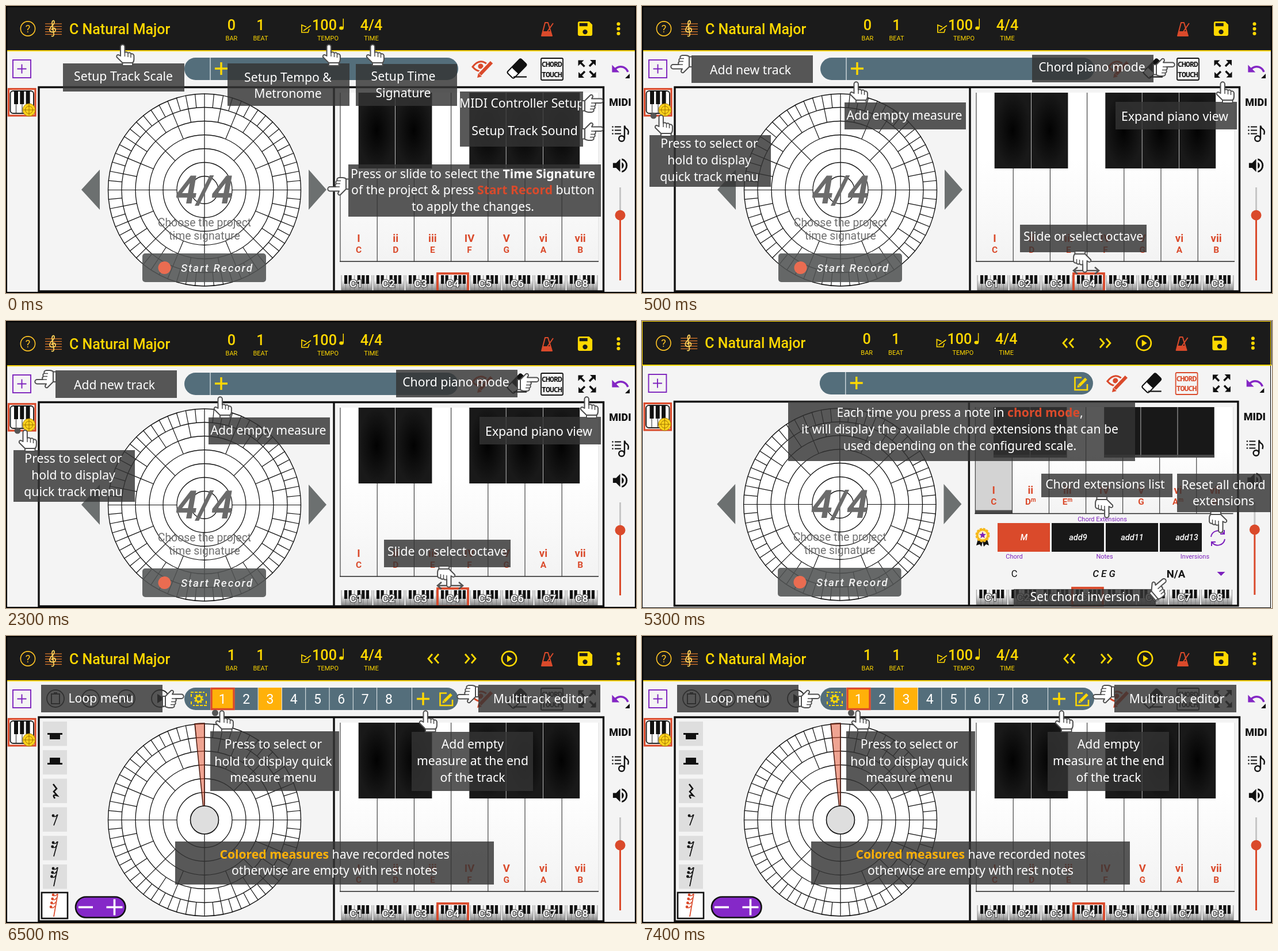
Animation, 1095 px wide and 500 px high, one loop 8000 ms. Source, as an HTML page:

```html
<!DOCTYPE html>
<html lang="en">
<head>
<meta charset="utf-8">
<title>Music app guide</title>
<style>
html, body { margin: 0; width: 100%; height: 100%; overflow: hidden; background: #f4f4f4; }
svg { display: block; width: 1095px; height: 500px; }
text { font-family: Roboto, sans-serif; text-anchor: middle; }
.tip { font-family: "Noto Sans", "Open Sans", sans-serif; font-size: 21.2px; fill: #fff; }
.chord { font-family: "Noto Sans Mono", monospace; letter-spacing: -.8px; }
.start { text-anchor: start; }
.it { font-style: italic; }
.md { font-weight: 500; }
.bd { font-weight: 700; }
</style>
</head>
<body>
<svg id="stage" viewBox="0 0 1095 500">
  <defs>
    <radialGradient id="ebony"><stop offset="0" stop-color="#020202"/><stop offset="1" stop-color="#191919"/></radialGradient>
    <linearGradient id="ivory" x2="0" y2="1"><stop offset=".4" stop-color="#fff"/><stop offset="1" stop-color="#f3f3f3"/></linearGradient>
    <linearGradient id="mini" x2="0" y2="1"><stop offset=".3" stop-color="#f4f4f4"/><stop offset="1" stop-color="#858585"/></linearGradient>
  </defs>
</svg>
<script>
const YELLOW = '#ffd800', RED = '#da4a2b', PURPLE = '#7d22bd', INK = '#111', GREY = '#6c7070';
const range = (n, fn) => Array.from({ length: n }, (_, i) => fn(i)).join('');

const rect = (x, y, x2, y2, fill, more = '') =>
  `<rect x="${x}" y="${y}" width="${x2 - x}" height="${y2 - y}" fill="${fill}" ${more}/>`;
const circle = (x, y, r, fill, more = '') => `<circle cx="${x}" cy="${y}" r="${r}" fill="${fill}" ${more}/>`;
const fill = (d, color, more = '') => `<path d="${d}" fill="${color}" ${more}/>`;
const line = (d, color, w = 1, more = '') => `<path d="${d}" fill="none" stroke="${color}" stroke-width="${w}" ${more}/>`;
const text = (x, y, s, size, color, cls = '', more = '') =>
  `<text x="${x}" y="${y}" font-size="${size}" fill="${color}" class="${cls}" ${more}>${s}</text>`;
const group = (move, body) => `<g transform="${move}">${body}</g>`;
const bold = (s, color) => `<tspan font-weight="700" fill="${color}">${s}</tspan>`;

// Lines are given as baseline, text, baseline, text...
function tip(x, y, x2, y2, cx, ...lines) {
  let out = rect(x, y, x2, y2, '#343434', 'fill-opacity=".82"');
  for (let i = 0; i < lines.length; i += 2) out += `<text class="tip" x="${cx}" y="${lines[i]}">${lines[i + 1]}</text>`;
  return out;
}

const hand = (x, y, turn = 0) => group(`translate(${x} ${y}) rotate(${turn})`,
  fill('M-3.5 20V4a3.7 3.7 0 0 1 7.4 0V14q3.500-2 5.500 1q4-2 5.500 1.500q4-1 5 3V26q0 4-3 7H1L-10 22q-1-4 3-4z', '#fff',
    'stroke="#4f4f4f" stroke-width="2" stroke-linejoin="round"') +
  line('M4 14v7M9.500 16v6M14.500 17v6', '#4f4f4f', 1.5) +
  rect(0, 32, 17.5, 37, '#fff', 'stroke="#4f4f4f" stroke-width="2"'));

function toolbar(bar, transport) {
  let out = rect(0, 0, 1097, 78, '#1b1b1b') + rect(0, 77, 1097, 79, YELLOW);
  out += circle(38, 39.5, 12.6, 'none', 'stroke="#ffc425" stroke-width="1.6"') + text(38, 46, '?', 18, '#ffc425');
  out += range(5, i => line(`M68 ${31 + i * 4.6}H97`, '#d9772b', 1.3));
  out += line('M79 52c3 2 5-1 4-4L80 30c0-5 4-6 4-2 0 6-9 8-8 14 1 5 11 5 10-1-1-4-7-3-6 1', '#ffd25a', 1.8);
  out += text(110, 48.5, 'C Natural Major', 25, YELLOW, 'md start');
  const fields = [[392, bar, 'BAR'], [442.5, 1, 'BEAT'], [553.5, 100, 'TEMPO', 559.5], [635, '4/4', 'TIME']];
  for (const [x, value, name, nx = x] of fields)
    out += text(x, 41.5, value, 25.2, YELLOW, 'md') + text(nx, 60, name, 11, YELLOW);
  out += line('M522 36.5L514 33V46H525L527 40M517 43L530 34', YELLOW, 1.7);
  out += `<ellipse cx="583" cy="38.5" rx="3.8" ry="3" fill="${YELLOW}"/>` + line('M586.3 22V38', YELLOW, 1.5);
  if (transport) {
    const chevrons = 'M-2 -8L-9 0L-2 8M9 -8L2 0L9 8';
    out += group('translate(743 39.5)', line(chevrons, YELLOW, 2.8));
    out += group('translate(807 39.5) scale(-1 1)', line(chevrons, YELLOW, 2.8));
    out += circle(874.5, 39.5, 12.6, 'none', `stroke="${YELLOW}" stroke-width="2.7"`) + fill('M871 33.5V45.5L880 39.5z', YELLOW);
  }
  out += line('M937 29H942L949 52H931zM933 45H947M940 46L951 30', RED, 2, 'stroke-linejoin="round"') + fill('M933 45H947L949 53H931z', RED);
  out += group('translate(989.7 22.7) scale(1.4)', fill('M17 3H5c-1.1 0-2 .9-2 2v14c0 1.1.9 2 2 2h14c1.1 0 2-.9 2-2V7zm-5 16a3 3 0 1 1 0-6 3 3 0 0 1 0 6zm3-10H5V5h10z', YELLOW));
  return out + range(3, i => circle(1064.5, 31.3 + i * 8.4, 3, YELLOW));
}

const plus = (x, y, r, color, w) => line(`M${x - r} ${y}H${x + r}M${x} ${y - r}V${y + r}`, color, w);
const editIcon = line('M766 99.5H754.5V121H776V111', YELLOW, 2.6) +
  line('M762 113.5L774 101.5', YELLOW, 5) + fill('M758.5 117l1-5 4 4z', YELLOW);

function measures() {
  const x = i => 356 + i * 41.3;
  let out = '';
  for (const i of [0, 2]) out += rect(x(i), 90, x(i) + 41, 129, '#ffb109');
  out += range(8, i => line(`M${x(i) - .5} 90V129`, '#e8eef0', 1) + text(x(i) + 20.3, 118, i + 1, 23, '#fff'));
  out += rect(357, 91.5, 396, 127.5, 'none', `stroke="${RED}" stroke-width="3.4"`);
  out += line('M705.5 90V129', '#e8eef0') + plus(725, 109.5, 11, YELLOW, 3.4);
  out += line('M322 106V98H345M348 100V106M348 113V121H325M322 119V113', YELLOW, 2, 'stroke-dasharray="5 2"');
  out += circle(335, 109.5, 4.8, 'none', `stroke="${YELLOW}" stroke-width="3"`);
  return out + circle(335, 109.5, 7, 'none', `stroke="${YELLOW}" stroke-width="2.4" stroke-dasharray="2.75"`);
}

function toolRow({ songs, edit, chord }) {
  let out = rect(12, 94, 43, 125, 'none', `stroke="${PURPLE}" stroke-width="1.9"`) + plus(27.5, 109.5, 8, PURPLE, 1.9);
  out += rect(310, 90, 786, 129, '#546e7b', 'rx="19.5"');
  out += songs ? measures() : line('M355 90V129', '#e8eef0', 1.2) + plus(374, 109, 11, YELLOW, 3.4);
  if (edit) out += editIcon;
  out += line('M811 106Q825 88 840 105Q825 122 811 106z', RED, 3) + circle(825, 105, 4.6, RED);
  out += line('M843 99L822 121', '#f4f4f4', 10) + line('M844 98L824 119', RED, 6) + fill('M819 125l2-8 6 6z', RED);
  out += group('translate(888 109) rotate(-46)', rect(-17, -8, 17, 8, '#fff', 'rx="3" stroke="#111" stroke-width="2"') + rect(-5, -8, 17, 8, INK, 'rx="2"'));
  out += line('M882 123.5H905', INK, 2.2);
  out += rect(930, 91, 968, 129, 'none', `rx="2" stroke="${chord}" stroke-width="1.8"`);
  out += text(948.5, 106, 'CHORD', 13, chord, 'chord bd') + text(948.5, 123.5, 'TOUCH', 13, chord, 'chord bd');
  out += range(4, i => group(`translate(1010 109.5) rotate(${i * 90})`,
    fill('M-15.5 -15H-5.5L-15.5 -5z', INK) + line('M-13 -12.5L-4.5 -4', INK, 3.4)));
  out += group('translate(1050.5 92.5) scale(1.43)', fill('M12.5 8c-2.65 0-5.05 1-6.9 2.6L2 7v9h9l-3.6-3.6c1.4-1.2 3.1-1.9 5.1-1.9 3.5 0 6.5 2.3 7.6 5.5l2.4-.8C21.1 11 17.2 8 12.5 8z', '#8427c4'));
  return out + fill('M1084 118V126H1076z', INK);
}

function sides() {
  let out = rect(4.5, 144.5, 51, 191, '#f8f8f8', `stroke="${RED}" stroke-width="3.2"`);
  out += rect(7.5, 148, 48, 187, '#fff', 'rx="5" stroke="#222" stroke-width="2"');
  out += line('M17.5 150V187M28 150V187M38 150V187', '#222', 1) + range(3, i => rect(14 + i * 10.3, 148, 21 + i * 10.3, 171, INK));
  out += circle(40, 181, 11, '#ffd21c', 'stroke="#8d6a00" stroke-width=".8"') + circle(40, 181, 6.5, 'none', 'stroke="#9a7400"') + plus(40, 181, 10, '#9a7400', 1);
  out += text(1067.5, 174, 'MIDI', 18, INK, '', 'font-weight="900"');
  out += range(3, i => circle(1054.5, 210.5 + i * 6, 1.3, INK) + line(`M1058 ${210.5 + i * 6}H1069`, INK, 2));
  out += circle(1070, 231, 4.8, 'none', 'stroke="#111" stroke-width="2.4"') + line('M1075 231V208.5Q1076 213 1080 215Q1083 218 1081 224', INK, 2.4);
  out += group('translate(1050.7 261) scale(1.4)', fill('M3 9v6h4l5 5V4L7 9zm13.5 3c0-1.8-1-3.3-2.5-4v8c1.5-.7 2.5-2.2 2.5-4zM14 3.2v2.1a7 7 0 0 1 0 13.4v2.1a9 9 0 0 0 0-17.6z', INK));
  out += line('M1067.5 316V364', '#c6c6c6', 3) + line('M1067.5 364V478', RED, 3) + circle(1067.5, 364.5, 9, RED);
  return out;
}

// Each ring outwards holds twice as many beats as the one inside it.
function wheel(cx = 345, cy = 320.5) {
  let out = circle(cx, cy, 168, '#fff');
  for (let ring = 1; ring < 7; ring++) {
    const beats = 2 ** ring, r = ring * 24, inner = ring === 1 ? 0 : r;
    let d = '';
    for (let i = 0; i < beats; i++) {
      const a = i / beats * 2 * Math.PI, sx = Math.sin(a), sy = -Math.cos(a);
      d += `M${cx + inner * sx} ${cy + inner * sy}L${cx + (r + 24) * sx} ${cy + (r + 24) * sy}`;
    }
    out += line(d, INK, 1.2) + circle(cx, cy, r, 'none', 'stroke="#111" stroke-width="1.3"');
  }
  return out + circle(cx, cy, 167.5, 'none', 'stroke="#111" stroke-width="1.4"');
}

const picker = () =>
  fill('M131 320L163 285V355zM557 320L526 285V355z', GREY) +
  text(345, 344, '4/4', 67.5, '#6b6b6b', 'bd it') +
  text(345, 384, 'Choose the project', 19.4, '#717171') + text(345, 407, 'time signature', 19.4, '#717171') +
  rect(237, 431, 452, 481, '#515454', 'rx="5" fill-opacity=".88"') + circle(275.5, 456, 11, '#ea6c51') +
  text(304, 463, 'Start Record', 19, '#f2f2f2', 'md it start', 'letter-spacing="1.9"');

function rest(y, n, color = INK) {
  const top = y - n * 4 - 4;
  return line(`M90 ${top}L83 ${y + n * 3 + 8}`, color, 1.7) + range(n, i => {
    const py = top + 2 + i * 7, px = 82 - i * 1.3;
    return circle(px, py, 2.4, color) + line(`M${px} ${py + 1}q5 2 7-3`, color, 1.4);
  });
}

function recorder() {
  let out = fill('M345 320L328 153Q336 152 345 152z', '#e2593a', 'fill-opacity=".55" stroke="#4a1a10" stroke-width="1.5"');
  out += circle(345, 320.5, 24.5, '#dedede', 'stroke="#111" stroke-width="1.6"');
  out += range(6, i => rect(64, 149 + i * 49.8, 106, 191.5 + i * 49.8, '#dedede'));
  out += rect(62, 447, 107, 492, '#fff', 'stroke="#111" stroke-width="2.6"');
  out += rect(72, 169, 98, 172, INK) + rect(76, 171, 94, 180, INK);
  out += rect(72, 221, 98, 224, INK) + rect(76, 212, 94, 222, INK);
  out += line('M82 258L88 266L83 271L89 278Q79 275 85 283', INK, 2.6);
  out += rest(319, 1) + rest(370, 2) + rest(419, 3) + rest(469, 4, RED);
  out += rect(121, 454.5, 207.5, 490.5, '#8528c8', 'rx="18" stroke="#111" stroke-width="2.6"');
  return out + line('M126 472.5H151', '#fff', 3.6) + plus(188.5, 472.5, 14, '#fff', 3.6);
}

function piano(bottom, blackEnd, chords) {
  const key = i => 581 + i * 64.2;
  let out = rect(581, 151, 1030, bottom, 'url(#ivory)');
  if (chords) out += rect(581, 151, 645, bottom, '#d3d3d3') + rect(581, bottom - 6, 645, bottom, '#4a4a4a');
  out += range(7, i => line(`M${key(i)} 151V${bottom}`, '#333', 1.1)) + line(`M1030 151V${bottom}`, '#ddd');
  out += line(`M580 ${bottom}H1030`, '#222', 1.3);
  for (const i of [1, 2, 4, 5, 6]) {
    const x = key(i) - 32.5;
    out += rect(x, 151, x + 63.5, blackEnd, chords ? '#181818' : 'url(#ebony)');
    if (chords) out += rect(x, blackEnd - 5, x + 63.5, blackEnd, '#484848');
  }
  const degrees = ['I', 'ii', 'iii', 'IV', 'V', 'vi', 'vii'], minor = [1, 2, 5];
  return out + range(7, i => {
    const m = chords && minor.includes(i) ? '<tspan font-size="10" dy="-5">m</tspan>' : '';
    const x = key(i) + 32;
    return text(x, bottom - 34, degrees[i], 18.5, RED, 'bd') + text(x, bottom - 15, 'CDEFGAB'[i] + m, 15.5, RED, 'bd');
  });
}

function octaves() {
  return range(8, i => group(`translate(${583 + i * 56} 469)`,
    rect(0, 0, 53, 27, 'url(#mini)') +
    range(8, k => line(`M${k * 7.57} 0V27`, '#777', .8)) +
    [1, 2, 4, 5, 6].map(k => rect(k * 7.57 - 2.6, 0, k * 7.57 + 2.6, 15, INK)).join('') +
    text(25.5, 20.5, 'C' + (i + 1), 19, '#fff', 'md', 'stroke="#555" stroke-width="2.6" paint-order="stroke"'))) +
    rect(750, 466, 803, 497, 'none', `stroke="${RED}" stroke-width="3.8"`);
}

function app({ bar = 0, songs, chords }) {
  return toolbar(bar, songs || chords) + toolRow({ songs, edit: songs || chords, chord: chords ? RED : INK }) + sides() +
    wheel() + (songs ? recorder() : picker()) +
    (chords ? piano(336.5, 239, true) : piano(445, 283)) + octaves() +
    line('M57 141.5H1038.5V497H57zM570 141V497', INK, 3.4);
}

function chordPanel() {
  const label = (x, y, s) => text(x, y, s, 11, PURPLE);
  let out = label(800, 349, 'Chord Extensions') + label(647, 414, 'Chord') + label(804, 414, 'Notes') + label(961, 414, 'Inversions');
  ['M', 'add9', 'add11', 'add13'].forEach((name, i) => {
    const x = 618 + i * 94;
    out += rect(x, 352, i < 3 ? x + 91 : 973, 402, i ? '#181818' : RED) + text(i < 3 ? x + 46 : 947, 382, name, 14.5, '#fff', 'md it');
  });
  out += fill('M584 380L581 391L587 389L590 393L592 384L594 393L598 389L603 391L600 380z', INK);
  out += circle(592, 373, 11, '#f6b91c', 'stroke="#f6b91c" stroke-width="3" stroke-dasharray="4 1.8"') + circle(592, 373, 7.5, '#fff2c4');
  out += fill('M592 367l1.7 4 4.3.3-3.3 2.8 1 4.2-3.7-2.3-3.7 2.3 1-4.2-3.3-2.8 4.3-.3z', PURPLE);
  out += line('M989 376A12.5 12.5 0 0 1 1011 370M1013 380A12.5 12.5 0 0 1 991 386', PURPLE, 2) +
    line('M1012 364V371H1005M990 392V385H997', PURPLE, 2);
  out += text(647, 445.5, 'C', 16.5, INK) + text(803, 445.5, 'C E G', 17, INK, 'it md') + text(928, 447, 'N/A', 18.5, INK, 'bd');
  return out + fill('M999.5 437H1013.5L1006.5 444z', PURPLE);
}

const loopIcons = () => {
  const ring = x => circle(x, 109, 15, 'none', 'stroke="#222" stroke-width="1.8"');
  return ring(86) + ring(147) + ring(209) + ring(268) + fill('M263 101V117L276 109z', INK) +
    line('M79 101H93V118H79zM83 99H89M139 104H155V114H139z', '#222', 2) + line('M203 115L216 102', '#222', 4);
};

const border = rect(1, 1, 1094, 499, 'none', 'stroke="#000" stroke-width="2"');
const chordBorder = rect(.5, .5, 1092.5, 499.5, 'none', 'stroke="#000"') +
  rect(.5, .5, 1092.5, 77, 'none', `stroke="${YELLOW}"`);

const scenes = [
  [0, app({}) +
    tip(99, 100, 310, 149, 204, 130, 'Setup Track Scale') +
    tip(385, 100, 597, 174, 490, 132, 'Setup Tempo &amp;', 160, 'Metronome') +
    tip(608, 101, 784, 174, 690.5, 130, 'Setup Time', 159, 'Signature') +
    tip(789, 149, 1003, 196, 896.5, 177, 'MIDI Controller Setup') +
    tip(789, 196, 1003, 245, 901.5, 225, 'Setup Track Sound') +
    tip(595, 276, 1034, 367, 811.5, 300, `Press or slide to select the ${bold('Time Signature', '#fff')}`,
      328, `of the project &amp; press ${bold('Start Record', RED)} button`, 357, 'to apply the changes.') +
    hand(202.5, 67) + hand(561, 67) + hand(637, 67) + hand(559, 319, -90) + hand(1038, 165, 90) + hand(1038, 214, 90) + border],

  [500, app({}) +
    tip(86, 86, 297, 134, 188.5, 119, 'Add new track') +
    tip(352, 168, 563, 215, 456, 198, 'Add empty measure') +
    circle(20, 191, 5.5, '#555') +
    tip(13, 225, 224, 315, 117, 247, 'Press to select or', 276, 'hold to display', 305, 'quick track menu') +
    tip(678, 85, 889, 133, 782, 114, 'Chord piano mode') +
    tip(823, 167, 1034, 215, 926, 200, 'Expand piano view') +
    tip(657, 381, 877, 429, 767, 409, 'Slide or select octave') +
    line('M750 461H794M757 455L750 461L757 467M787 455L794 461L787 467', '#555', 2.6) +
    hand(50, 106, -90) + hand(372, 132) + hand(33, 190) + hand(926, 102, 90) + hand(1009, 132) + hand(770, 464, 180) + border],

  [3500, group('translate(-.5 -1) scale(.998 1)', app({ chords: true })) + chordPanel() +
    tip(254, 140, 857, 244, 552.5, 167, `Each time you press a note in ${bold('chord mode', RED)},`,
      196, 'it will display the available chord extensions that can be', 225, 'used depending on the configured scale.') +
    tip(694, 266, 922, 307, 805, 292, 'Chord extensions list') +
    tip(930, 266, 1093, 333, 1010.5, 293, 'Reset all chord', 321, 'extensions') +
    tip(646, 467, 893, 497, 770, 488, 'Set chord inversion') +
    hand(808, 343, 180) + hand(1006, 369, 180) + hand(910, 450, 50) + chordBorder],

  [6500, app({ bar: 1, songs: true }) + loopIcons() +
    tip(61, 85, 272, 133, 165, 116, 'Loop menu') +
    tip(821, 85, 1033, 133, 929.5, 117, 'Multitrack editor') +
    circle(363.5, 134, 5.5, '#555') +
    tip(355, 166, 579, 270, 464.5, 196, 'Press to select or', 226, 'hold to display quick', 254, 'measure menu') +
    tip(705, 167, 916, 270, 811, 196, 'Add empty', 225, 'measure at the end', 254, 'of the track') +
    tip(294, 358, 848, 433, 571, 388, `${bold('Colored measures', '#ffb109')} have recorded notes`,
      416, 'otherwise are empty with rest notes') +
    hand(309, 105, 90) + hand(784, 106, -90) + hand(375, 130) + hand(729, 130) + border]
];

const stage = document.getElementById('stage');
stage.insertAdjacentHTML('beforeend', rect(0, 0, 1095, 500, '#f4f4f4') +
  scenes.map(([, body]) => `<g class="scene">${body}</g>`).join(''));
const layers = [...stage.querySelectorAll('.scene')];

function draw() {
  const now = performance.now() % 8000;
  const current = scenes.filter(([start]) => start <= now).length - 1;
  layers.forEach((layer, i) => { layer.style.display = i === current ? '' : 'none'; });
  requestAnimationFrame(draw);
}
draw();
</script>
</body>
</html>
```
